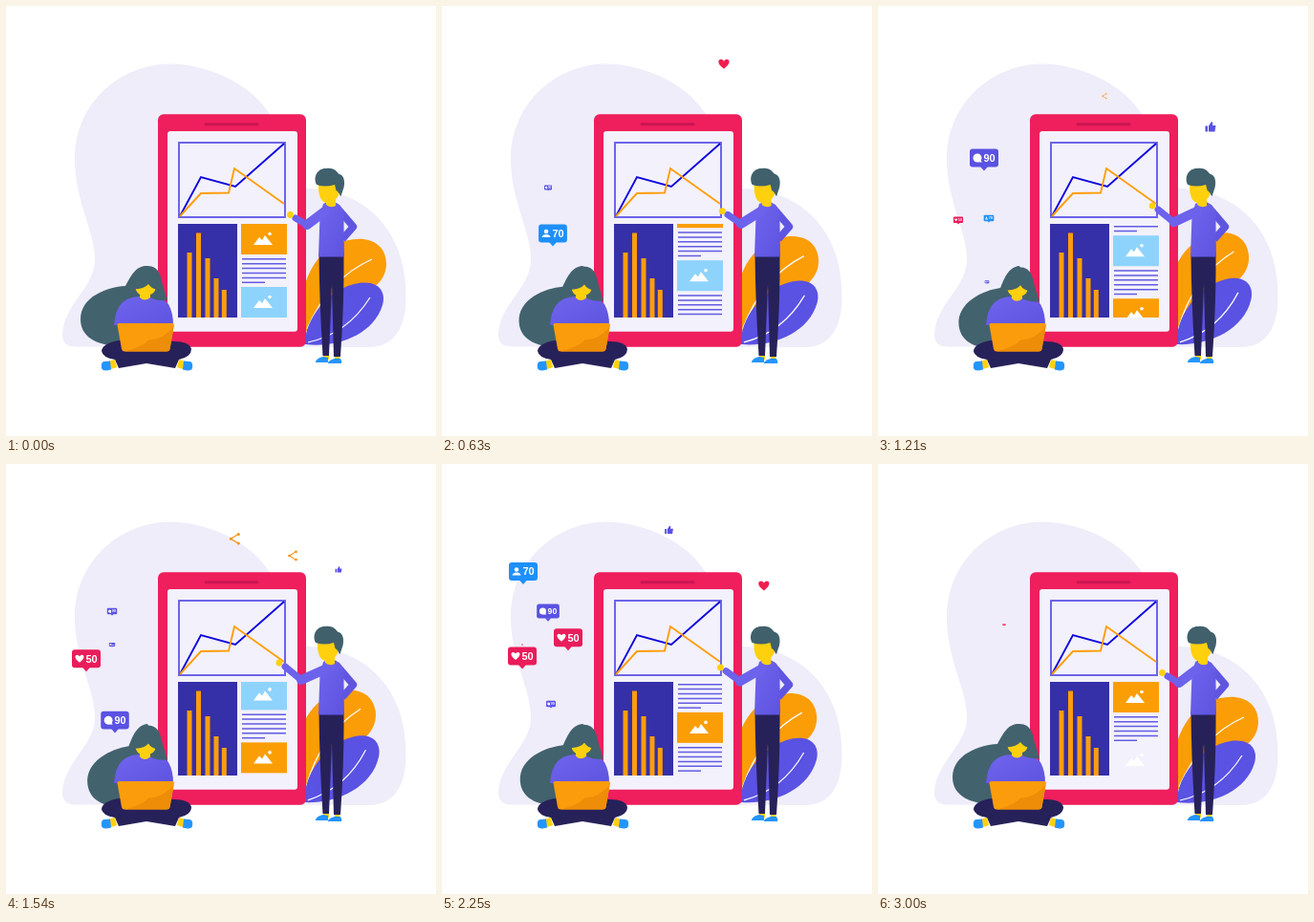
An HTML page for the animation above (3040 ms loop, 450 px wide and 450 px high).

```html
<!DOCTYPE html>
<html lang="en">
<head>
<meta charset="utf-8">
<title>Analytics illustration</title>
<style>
  html, body { margin: 0; width: 100%; height: 100%; overflow: hidden; background: #fff; }
  svg { display: block; width: 100vw; height: 100vh; }
  text { font: bold 11px "Liberation Sans", Arial, sans-serif; fill: #fff; }
</style>
</head>
<body>
<svg viewBox="0 0 450 450">
  <defs>
    <linearGradient id="shirt" x2="1" y2="1">
      <stop stop-color="#6f65ee"/><stop offset="1" stop-color="#5d53df"/>
    </linearGradient>
    <clipPath id="column"><rect x="246" y="228" width="48" height="98"/></clipPath>
  </defs>

  <path fill="#efedf9" d="M171 60.5C120 61 72 101 72 160C72 205 93 235 93 265C93 295 60 312 59 344Q59 356.5 73 356.5L380 357C407 357 418.5 335 418.5 305C420 240 380 192 314 191L276 113C255 81 213 61 171 60.5Z"/>

  <g id="orangeLeaf">
    <path fill="#fb9d06" d="M313 342C303 306 315 266 344 250C372 237 398 245 398 270C397 306 345 304 313 342Z"/>
    <path d="M315 338Q338 285 383 265" fill="none" stroke="#fff" stroke-width="1.2"/>
  </g>
  <g id="blueLeaf">
    <path fill="#5a52e2" d="M313 354C312 328 338 295 369 290C390 287 398 299 394 313C384 345 345 358 313 354Z"/>
    <path d="M316 352Q357 343 381 305" fill="none" stroke="#fff" stroke-width="1.2"/>
  </g>

  <!-- tablet -->
  <rect x="159" y="113.3" width="155" height="243.4" rx="6" fill="#ef1e5c"/>
  <path d="M209 123.7H263" stroke="#cb1553" stroke-width="3" stroke-linecap="round"/>
  <rect x="169" y="131" width="136" height="209.7" rx="3" fill="#f3f1fc"/>
  <rect x="181" y="143" width="111" height="78" fill="none" stroke="#6c65ea" stroke-width="2"/>
  <g fill="none" stroke-width="1.9">
    <path d="M182 220L204 179L240 189L291 144" stroke="#0d05dc"/>
    <path d="M182 220L204 196L233 195.5L239 170L291 207" stroke="#ff9e0a"/>
  </g>
  <rect x="180" y="228" width="62" height="98" fill="#352fa8"/>
  <path d="M192 326V258M201.5 326V237.5M211 326V264M220 326V285M228.3 326V297" stroke="#fb9e0d" stroke-width="5"/>
  <g clip-path="url(#column)"><g id="feed"></g></g>

  <!-- standing man -->
  <path fill="#ffd00d" d="M332 360h6v10h-6zM344 360h5v11h-5z"/>
  <path fill="#2495ff" d="M324 372Q326 368 332 367L337 368V373H324ZM337 373Q339 370 344 369L350 369Q352 372 351 374H337Z"/>
  <path fill="#272159" d="M327.5 259H353.5Q354 310 350 367H343L341 292L338 366H331.5Q328 310 327.5 259Z"/>
  <path d="M349 214L363.5 231L352 244" fill="none" stroke="#5f55e1" stroke-width="7.5" stroke-linejoin="round"/>
  <path fill="url(#shirt)" d="M332 207Q341 202 349 208Q355 213 353.5 228L354 262.5H327L328.5 220Z"/>
  <path id="upperArm" fill="none" stroke="#6c62ec" stroke-width="10" stroke-linecap="round"/>
  <path id="foreArm" fill="none" stroke="#6c62ec" stroke-width="7" stroke-linecap="round"/>
  <circle id="hand" r="3.4" fill="#ffd00d"/>
  <g id="manHead">
    <path fill="#ffd00d" d="M327 184H347L349 194Q348 200 345 202L345 209Q340 212 335 208V206Q326 204 327 184Z"/>
    <path fill="#40606c" d="M325 187C321 179 326 169.5 335 170C341 168.5 346 172 348 175.5C355 177 354.5 186 353.5 190L350.5 199C349 198 349 195 345.5 193L344 187Q334 190 325 187Z"/>
  </g>

  <!-- sitting woman -->
  <path id="hair" fill="#42626e" d="M147 272C135 272 130 284 125 293C106 294 78 304 78 328C78 345 93 355 118 356L140 345L152 290Z"/>
  <path fill="#272159" d="M118 350Q101 353 100 361Q101 368 114 370L118 379L147 374L177 379L181 370Q194 367 194 359Q192 351 176 351Z"/>
  <g id="feet"></g>
  <path fill="url(#shirt)" d="M139 304H152Q164 305 170 312Q175 321 175 334H113Q114 319 121 311Q127 305 139 304Z"/>
  <g id="womanHead">
    <path fill="#42626e" d="M134 296C131 282 138 272 148 272C161 272 162 284 164 292L169 308Q160 309 153 306Z"/>
    <path fill="#ffd00d" d="M135 291Q147 285 157 292Q157 300 151 302V305Q145 310 140 305V302Q135 299 135 291Z"/>
    <path fill="#42626e" d="M133 294C133 281 141 277 147 278C157 278 160 287 159 297Q152 296 149 291Q144 297 133 296Z"/>
  </g>
  <path fill="#fb9c0c" d="M118 332H174Q176 332 176 334L171.5 359Q171 361.5 168 361.5H124Q121.500 361.500 121 359L116.500 334Q116.500 332 118 332Z"/>
  <path fill="#ee8d08" d="M175.500 336L171.500 359Q171 361.500 168 361.500H124Q143 357 150 349Q161 351 175.500 336Z"/>

  <g id="floats"></g>
</svg>

<script>
const $ = id => document.getElementById(id);
const LOOP = 3040, FRAME = 1000 / 24;

const foot = place => `<g transform="${place}">
  <path d="M107 376.500L115 374" stroke="#ffd00d" stroke-width="8.500"/>
  <path d="M109 371.500L110 380.500Q101 383 100 379Q99 372 103 372Z" fill="#2495ff"/></g>`;
$('feet').innerHTML = foot('') + foot('matrix(-1 0 0 1 295 0)');

// scrolling column: pictures alternate with paragraphs
const picture = (y, color) => `<g transform="translate(246 ${y})">
  <rect width="48" height="32" fill="${color}"/>
  <path d="M13 22L19 14L22 17L25 12L33 22Z" fill="#fff"/><circle cx="30" cy="10.5" r="1.8" fill="#fff"/></g>`;
const paragraph = y => [0, 1, 2, 3, 4, 5].map(i =>
  `<path d="M247 ${y + i * 4.9}H${i < 5 ? 293 : 271}" stroke="#625be2" stroke-width="1.5"/>`).join('');
$('feed').innerHTML = ['#fb9e06', '#8ed3fb', '#fb9e06', 'none'].map((color, i) =>
  picture(228 + i * 66, color) + paragraph(264.8 + i * 66)).join('');

const heart = 'M0 5C-8 -1 -6 -5 -3 -5Q-1 -5 0 -3Q1 -5 3 -5C6 -5 8 -1 0 5Z';
const badge = (color, icon, label) => `
  <rect x="-15" y="-9.5" width="30" height="19" rx="3" fill="${color}"/>
  <path d="M-4 9L0 13.5L4 9Z" fill="${color}"/>
  <g transform="translate(-7 0)" fill="#fff">${icon}</g><text x="-.5" y="4">${label}</text>`;
const looks = {
  people: badge('#1e90fb', '<circle cy="-2" r="2.3"/><path d="M-4.5 4Q-4 1 0 1T4.5 4Z"/>', 70),
  chat: badge('#5a52e2', '<circle r="4.5"/><path d="M0 4L4.5 4.7L3.500 1Z"/>', 90),
  like: badge('#ea1c5b', `<path transform="scale(.8)" d="${heart}"/>`, 50),
  heart: `<path d="${heart}" fill="#ef1e4f"/>`,
  thumb: '<path d="M-5.5 -1H-3V5H-5.5ZM-2 -1L1 -5.5Q3 -5 2 -1.5H5.5L4.5 5H-2Z" fill="#5a52e2"/>',
  share: `<path d="M4 -5L-4 0L4 5" fill="none" stroke="#f9930d" stroke-width="1.2"/>
    <g fill="#f9930d"><circle cx="4" cy="-4.7" r="1.5"/><circle cx="-4" r="1.5"/><circle cx="4" cy="4.7" r="1.5"/></g>`
};

// badges: look, birth, x, start y, life
const badges = [
  ['people', 235, 116, 262], ['chat', 565, 111, 194], ['like', 1130, 84, 229],
  ['chat', 1175, 114, 291, 1240], ['chat', 1495, 111, 192], ['people', 1620, 85, 147],
  ['like', 1780, 84, 229], ['like', 1815, 132, 208, 1235]
].map(([look, birth, x, y, life = 1150]) => ({
  look, birth, life, fade: 500,
  at: age => [x, y - 40 * Math.sin(Math.PI / 2 * Math.min(1, age / 950))]
}));

// loose icons: look, birth, x, start y, sideways drift
const icons = [
  ['heart', 140, 295, 84, 0], ['thumb', 780, 348, 147, 0], ['share', 1090, 236, 100, 7],
  ['share', 1270, 300, 109, 0], ['thumb', 1540, 245, 103, -10], ['heart', 1825, 340, 148, -7]
].map(([look, birth, x, y, drift]) => ({
  look, birth, life: 950, fade: 300,
  at: age => [x + drift * age / 950, y - .048 * age]
}));

const floats = [...badges, ...icons];
$('floats').innerHTML = floats.map(f => `<g>${looks[f.look]}</g>`).join('');
floats.forEach((f, i) => f.node = $('floats').children[i]);

const grow = age => 1 - (1 - Math.min(1, age / 420)) ** 2;
const move = (id, value) => $(id).setAttribute('transform', value);

function draw(t) {
  move('feed', `translate(0 ${-Math.min(132, .0445 * t)})`);

  const sway = (1 - Math.cos(2 * Math.PI * t / LOOP)) / 2;
  move('orangeLeaf', `rotate(${-8 * sway} 314 345)`);
  move('blueLeaf', `rotate(${-5 * sway} 314 354)`);
  move('hair', `translate(${2.5 * sway} 0) rotate(${-6 * sway} 147 285)`);
  move('womanHead', `translate(0 ${1.5 * sway})`);
  move('manHead', `translate(${-sway} 0)`);

  const elbow = `${315 - 6 * sway} ${229 - 3 * sway}`;
  $('upperArm').setAttribute('d', `M333.5 215L${elbow}`);
  $('foreArm').setAttribute('d', `M${elbow}L${303 - 11 * sway} ${222 - 10 * sway}`);
  move('hand', `translate(${297.5 - 11.5 * sway} ${218.5 - 10.5 * sway})`);

  for (const f of floats) {
    const age = t - f.birth;
    const size = age > 0 ? Math.max(0, Math.min(grow(age), (f.life - age) / f.fade)) : 0;
    f.node.setAttribute('visibility', size ? 'visible' : 'hidden');
    if (size) f.node.setAttribute('transform', `translate(${f.at(age)}) scale(${size})`);
  }
}

const start = performance.now();
function tick() {
  const t = Math.max(0, performance.now() - start) % LOOP;
  draw(Math.min(72, Math.floor((t + 5) / FRAME)) * FRAME);
  requestAnimationFrame(tick);
}
tick();
</script>
</body>
</html>
```
